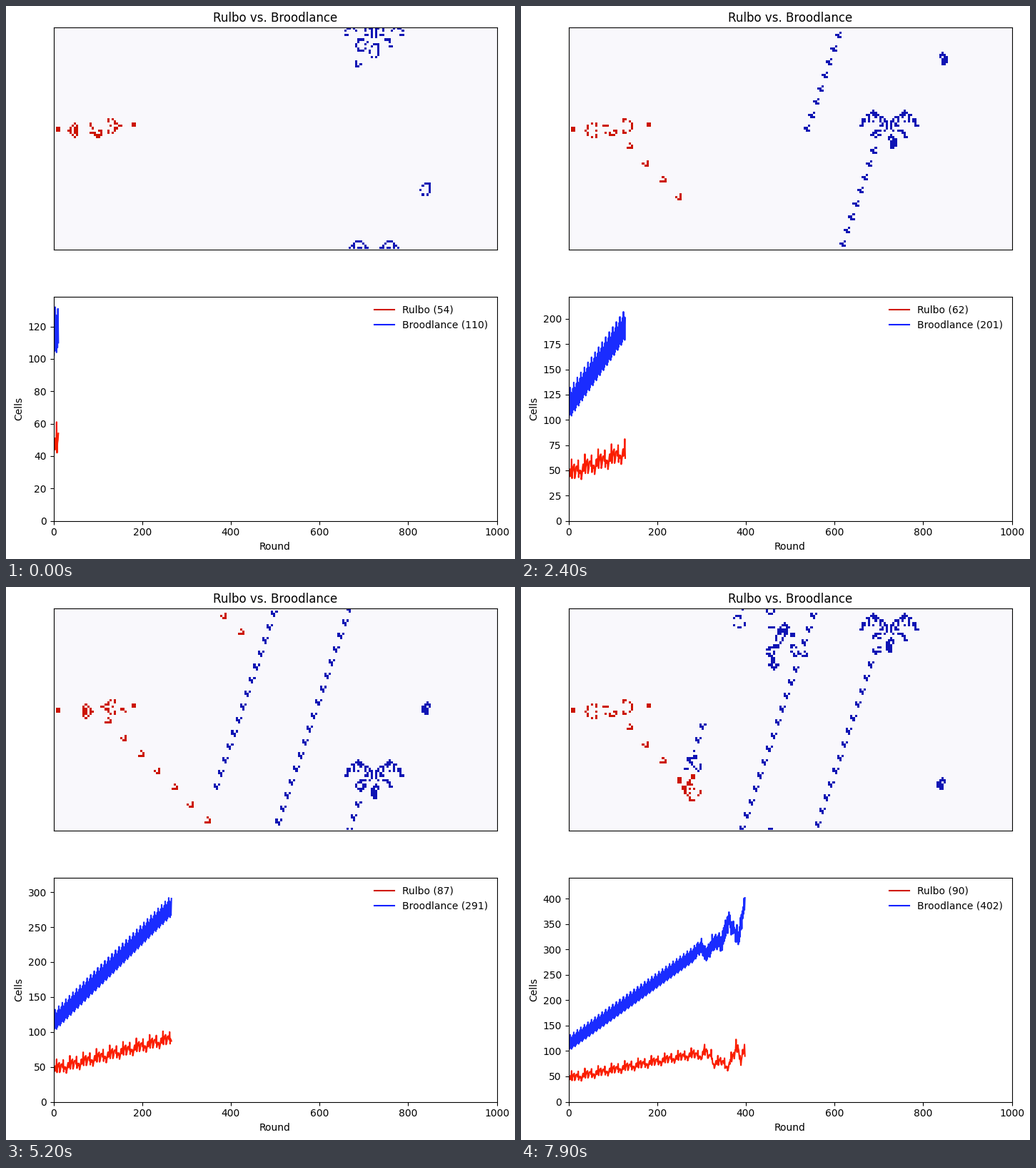
A matplotlib script for the animation above (8000 ms loop, 713 by 774 pixels).

```python
import numpy as np
import matplotlib.pyplot as plt
from matplotlib.animation import FuncAnimation
from matplotlib.colors import ListedColormap

W, H = 713, 774
COLS, ROWS = 200, 100
FRAMES, INTERVAL = 80, 100
FIRST, STRIDE, HOLD, LEAD = 12, 3, 61.25, 33  # rounds shown, and ms per shown round
RED, BLUE = 1, 2
NAMES = "Rulbo", "Broodlance"

GUN = ("24bo$22bobo$12b2o6b2o12b2o$11bo3bo4b2o12b2o$2o8bo5bo3b2o$"
       "2o8bo3bob2o4bobo$10bo5bo7bo$11bo3bo$12b2o")
BACKRAKE = ("5b3o11b3o$4bo3bo9bo3bo$3b2o4bo7bo4b2o$2bobob2ob2o5b2ob2obobo$"
            "b2obo4bob2ob2obo4bob2o$o4bo3bo2bobo2bo3bo4bo$12bobo$"
            "2o7b2obobob2o7b2o$12bobo$6b3o9b3o$6bo3bo9bo$6bobo4b3o$"
            "12bo2bo4b2o$15bo$11bo3bo$11bo3bo$15bo$12bobo")
MWSS = "2b3o$bo2bo$4bo$o3bo$4bo$bobo"


def place(board, rle, x, y, team):
    for dy, line in enumerate(rle.split("$")):
        col, digits = x, ""
        for ch in line:
            if ch.isdigit():
                digits += ch
                continue
            run = int(digits or 1)
            if ch == "o":
                board[(y + dy) % ROWS, col:col + run] = team
            col, digits = col + run, ""


def neighbours(mask):
    m = mask.astype(int)
    return sum(np.roll(m, (dy, dx), (0, 1))
               for dy in (-1, 0, 1) for dx in (-1, 0, 1) if dx or dy)


def step(board):
    """Life on a torus; a new cell joins the majority of its parents."""
    r, b = neighbours(board == RED), neighbours(board == BLUE)
    n = r + b
    alive = board > 0
    born = np.where(~alive & (n == 3), np.where(r > b, RED, BLUE), 0)
    return np.where(alive & ((n == 2) | (n == 3)), board, born)


def round_at(i):
    return FIRST + STRIDE * int((i * INTERVAL + LEAD) // HOLD)


board = np.zeros((ROWS, COLS), int)
place(board, GUN, 1, 41, RED)
place(board, BACKRAKE, 131, 2, BLUE)
place(board, MWSS, 165, 76, BLUE)
boards = [board]
for _ in range(round_at(FRAMES - 1)):
    boards.append(step(boards[-1]))
counts = np.array([[(b == team).sum() for b in boards] for team in (RED, BLUE)])

plt.rcParams["font.family"] = "DejaVu Sans"
fig = plt.figure(figsize=(W / 100, H / 100), dpi=100, facecolor="white")


def add_axes(top, bottom):
    return fig.add_axes([66.5 / W, 1 - bottom / H, 621 / W, (bottom - top) / H])


world = add_axes(30.5, 340.5)
world.set_title(" vs. ".join(NAMES))
world.set(xticks=[], yticks=[])
image = world.imshow(board, cmap=ListedColormap(["#f9f8fc", "#cc1400", "#0f14b4"]),
                     vmin=0, vmax=2, aspect="auto", interpolation="nearest")

chart = add_axes(406.5, 720.5)
chart.set(xlim=(0, 1000), xlabel="Round", ylabel="Cells")
lines = [chart.plot([], [], color=c, label=name)[0]
         for c, name in zip(("#fa1e00", "#1a2cff"), NAMES)]
legend = chart.legend(loc="upper right", frameon=False)
for handle, c in zip(legend.get_lines(), ("#d01800", "#1020ff")):
    handle.set_color(c)


def draw(i):
    n = round_at(i)
    image.set_data(boards[n])
    for line, text, name, count in zip(lines, legend.get_texts(), NAMES, counts):
        line.set_data(range(n), count[1:n + 1])
        text.set_text(f"{name} ({count[n]})")
    # The axis only grows with the rounds that were shown.
    chart.set_ylim(0, 1.1 * counts[:, STRIDE:n + 1:STRIDE].max())
    return [image, *lines]


anim = FuncAnimation(fig, draw, frames=FRAMES, interval=INTERVAL,
                     repeat=True, repeat_delay=0, blit=False)
plt.show()
```
